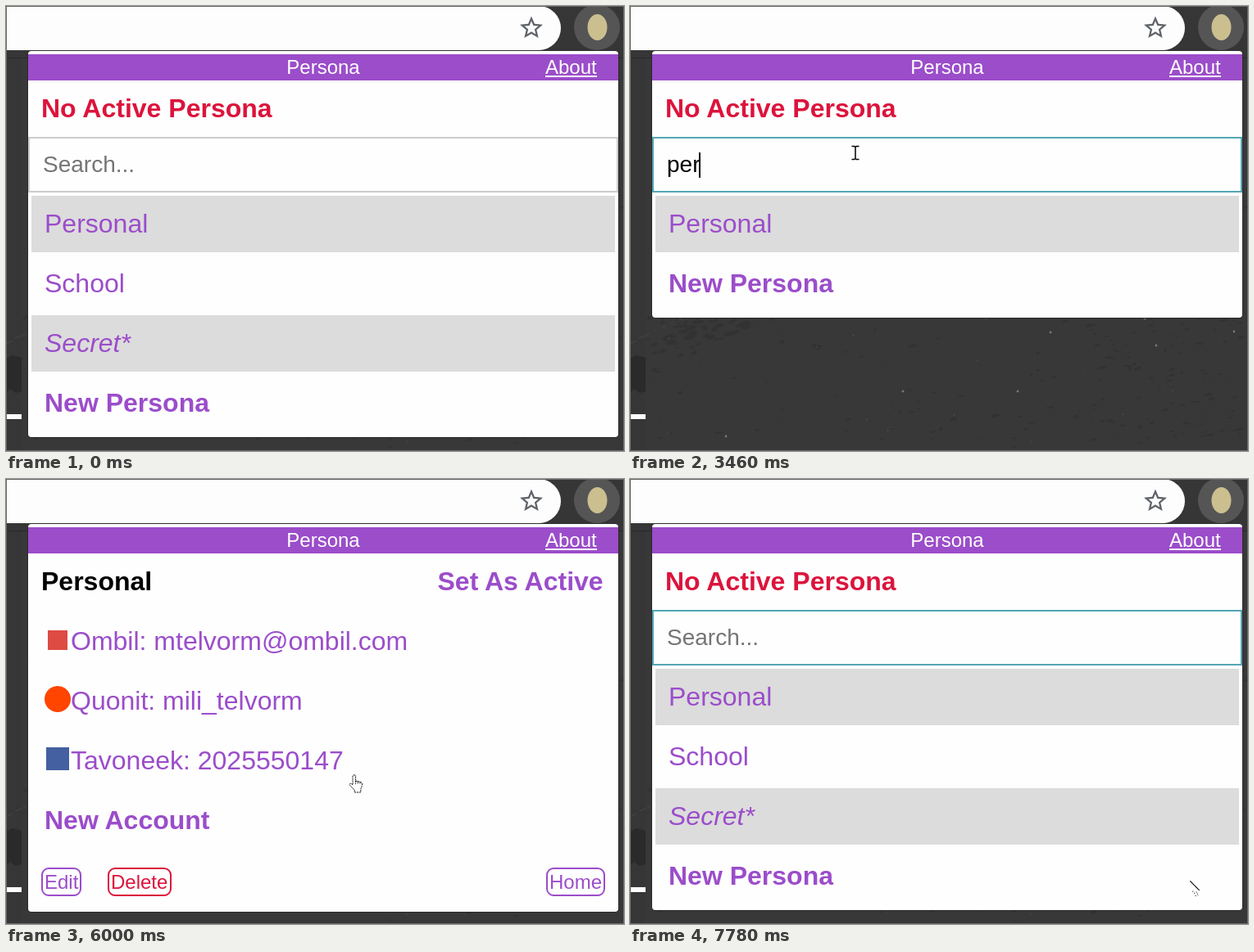
Write an HTML page that moves like this. It is 754 px wide and 544 px high and loops after 8 s.

```html
<!DOCTYPE html>
<html lang="en">
<head>
<meta charset="utf-8">
<title>Persona</title>
<style>
  html, body { margin: 0; width: 100%; height: 100%; overflow: hidden; background: #383838; }
  svg { display: block; width: 754px; height: 544px; }
  text { font-family: "Liberation Sans", Arial, sans-serif; font-size: 32px; fill: #9b4dca; white-space: pre; }
  .b { font-weight: bold; }
  .i { font-style: italic; }
  .s { font-size: 24px; }
  .m { font-size: 28px; }
</style>
</head>
<body>
<svg id="stage" viewBox="0 0 754 544">
  <defs>
    <clipPath id="cut"><rect id="cutBox" width="754" height="544"/></clipPath>
  </defs>
  <rect width="754" height="544" fill="#383838"/>
  <g id="wall"></g>
  <rect width="754" height="63" fill="#363636"/>
  <rect y="63" width="754" height="1" fill="#292929"/>
  <rect y="499" width="19" height="6" fill="#fefefe"/>
  <path d="M0 0H650A27 27 0 0 1 650 54H0Z" fill="#fdfdfe"/>
  <path transform="translate(624.2 9.7) scale(1.4)" fill="#5f6368" fill-rule="evenodd"
    d="M22 9.24l-7.19-.62L12 2 9.19 8.63 2 9.24l5.46 4.73L5.82 21 12 17.27 18.18 21l-1.63-7.03L22 9.24zM12 15.4l-3.76 2.27 1-4.28-3.32-2.88 4.38-.38L12 6.1l1.71 4.04 4.38.38-3.32 2.88 1 4.28L12 15.4z"/>
  <circle cx="721" cy="26" r="28" fill="#555"/>
  <ellipse cx="721.5" cy="26" rx="12" ry="16" fill="#cbbf90"/>

  <g id="popup" clip-path="url(#cut)">
    <rect id="shade" x="26" y="54.5" width="722" rx="5" fill="#2b2b2b"/>
    <rect id="panel" x="27" y="55" width="720" rx="4" fill="#fefefe"/>
    <rect x="27" y="59" width="720" height="32" fill="#9b4dca"/>
    <g id="bar"></g>
    <g id="home">
      <rect id="field" x="28" y="161" width="718" height="66" fill="#fefefe" stroke-width="2"/>
    </g>
    <g id="account"></g>
  </g>

  <g id="arrow">
    <path d="M.5 .5V16l3.7-3.4L7 19l2.6-1.1L7 11.8h5Z" fill="#fefefe"/>
    <path d="M.3 .3L11.7 11.8" stroke="#000" stroke-width="1.1"/>
    <path d="M3 13.2h2M5 15.3h1.5M8 13.5l2.2 4.8M6.5 18.5h2" stroke="#222" stroke-width="1" stroke-dasharray="1.2 1" fill="none"/>
  </g>
  <path id="beam" d="M.5 .5H3.7L5 1.6 6.3 .5H9.5M5 1V16M.5 16.5H3.7L5 15.4 6.3 16.5H9.5" fill="none" stroke="#000" stroke-width="1.5"/>
  <g id="hand" stroke="#111" stroke-width="1" stroke-dasharray="2 .8">
    <path d="M6.8 .8C8 .8 8.6 1.5 8.6 2.5V8L14.2 9.3C15.8 9.7 16.5 10.5 16.5 12 16.5 15 15.2 16.5 14.8 18.5V22H7.2V19.3L1.6 13.5C.6 12 2 10.6 3.5 11.5L5 13V2.5C5 1.5 5.6 .8 6.8 .8Z" fill="#fefefe"/>
    <path d="M8.6 8V12M11.3 8.8V12M14 9.5V12.3" fill="none"/>
  </g>
  <rect x=".5" y=".5" width="753" height="543" fill="none" stroke="#686868"/>
</svg>
<script>
const LOOP = 8000, PURPLE = '#9b4dca', RED = '#dc143c';
const $ = id => document.getElementById(id);

function add(parent, tag, attrs, content) {
  const el = document.createElementNS('http://www.w3.org/2000/svg', tag);
  for (const k in attrs) el.setAttribute(k, attrs[k]);
  if (content) el.textContent = content;
  return parent.appendChild(el);
}
const label = (parent, x, y, str, cls = '', fill = PURPLE) =>
  add(parent, 'text', { x, y, class: cls, style: `fill:${fill}` }, str);
const box = (parent, x, y, width, height, fill) =>
  add(parent, 'rect', { x, y, width, height, fill });
const show = (el, on) => { el.style.display = on ? '' : 'none'; };

// Chalkboard-like backdrop: dark flecks along a diagonal, a few pale specks
function drawWall() {
  let seed = 11;
  const rnd = () => (seed = seed * 16807 % 2147483647) / 2147483647;
  const wall = $('wall');
  const fleck = (x, y, size) => {
    const w = size * (1 + rnd() * 2), h = size * (.4 + rnd() * .6);
    return `M${x} ${y}l${w} ${-h}l${w * .6} ${h * .8}l${-w * .5} ${h}l${-w * .9} ${h * .3}z`;
  };
  let dark = '';
  for (let i = 0; i < 330; i++) {
    const x = 20 + rnd() * 540, spread = (rnd() + rnd() - 1) * 38;
    dark += fleck(x, 425 - x * .41 + spread, 1 + rnd() * 4);
  }
  for (let i = 0; i < 260; i++) dark += fleck(20 + rnd() * 730, 200 + rnd() * 340, .6 + rnd() * 2.2);
  for (let i = 0; i < 120; i++) dark += fleck(560 + rnd() * 190, 360 + rnd() * 170, .6 + rnd() * 2);
  add(wall, 'path', { d: dark, fill: '#323232' });
  add(wall, 'path', { d: 'M0 412L130 350M150 338L310 268M330 262L480 190', stroke: '#464646', 'stroke-dasharray': '5 6 2 9' });
  box(wall, 0, 64, 19, 480, '#363636');
  add(wall, 'path', { d: 'M0 431L8 427 19 430V471L12 473 5 468 0 473Z', fill: '#2a2a2a' });
  add(wall, 'path', { d: 'M0 413l8-4M11 406l8-3', stroke: '#484848' });
  for (let i = 0; i < 45; i++)
    add(wall, 'circle', { cx: 20 + rnd() * 730, cy: 210 + rnd() * 325, r: .5 + rnd() * .6, fill: '#4c4c4c' });
  for (const [cx, cy] of [[139, 256], [265, 348], [428, 375], [513, 399], [628, 382], [642, 415], [737, 398], [473, 471], [333, 471], [117, 526]])
    add(wall, 'circle', { cx, cy, r: 1.4, fill: '#777' });
}
drawWall();

label($('bar'), 342.3, 83, 'Persona', 's', '#fff');
label($('bar'), 658, 83, 'About', 's', '#fff');
box($('bar'), 658, 85, 63, 2, '#fff');

const home = $('home');
label(home, 43, 136, 'No Active Persona', 'b', RED);
const hint = label(home, 45, 203, 'Search...', 'm', '#757575');
const query = label(home, 45, 203, '', 'm', '#000');
const caret = box(home, 45, 179, 2, 31, '#000');
box(home, 31, 232, 712, 69, '#dcdcdc');
label(home, 47, 277, 'Personal');
const others = add(home, 'g', {});
label(others, 47, 350, 'School');
box(others, 31, 378, 712, 69, '#dcdcdc');
label(others, 47, 423, 'Secret*', 'i');
const newPersona = label(home, 47, 496, 'New Persona', 'b');

const account = $('account');
label(account, 43, 136, 'Personal', 'b', '#000');
label(account, 526.5, 136, 'Set As Active', 'b');
box(account, 51, 185, 24, 24, '#dd4b43');
add(account, 'circle', { cx: 63, cy: 269, r: 16, fill: '#ff4500' });
box(account, 49, 328, 28, 28, '#4460a0');
['Ombil: mtelvorm@ombil.com', 'Quonit: mili_telvorm', 'Tavoneek: 2025550147']
  .forEach((str, i) => label(account, 79, 209 + 73 * i, str));
label(account, 47, 428, 'New Account', 'b');
function button(x, width, str, color) {
  add(account, 'rect', { x: x + 1, y: 476, width: width - 2, height: 33, rx: 8, fill: 'none', stroke: color, 'stroke-width': 2 });
  label(account, x + 4, 501, str, 's', color);
}
button(43, 49, 'Edit', PURPLE);
button(124, 78, 'Delete', RED);
button(659, 72, 'Home', PURPLE);

// [time, kind, left, top]
const pointer = [
  [0, ''], [460, 'arrow', 513, 473], [580, 'arrow', 444, 448], [700, 'arrow', 383, 311],
  [850, 'beam', 294, 169], [1000, 'arrow', 297, 151], [1130, 'arrow', 291, 155],
  [1280, 'beam', 281, 161], [1410, 'beam', 272, 165], [1560, 'beam', 270, 171],
  [4690, 'hand', 271, 189], [6000, 'hand', 418, 361], [6150, 'hand', 494, 414],
  [6270, 'arrow', 573, 459], [6420, 'arrow', 635, 477], [6570, 'arrow', 651, 482],
  [6690, 'hand', 660, 481], [6840, 'hand', 667, 488], [6960, 'hand', 671, 491],
  [7110, 'arrow', 683, 491]
];
// [time, page, panel bottom, visible bottom]
const views = [
  [0, 'home', 527, 544], [2940, 'found', 381, 544], [4570, 'account', 529, 381],
  [4690, 'account', 529, 544], [7110, 'account', 529, 201], [7260, 'home', 527, 544]
];
const keys = [2820, 3190, 3460, 3740, 3870, 4020, 4180, 4300];
const at = (list, t) => list.filter(e => e[0] <= t).pop();

function draw(t) {
  const [, page, bottom, visible] = at(views, t);
  $('panel').setAttribute('height', bottom - 55);
  $('shade').setAttribute('height', bottom - 53.5);
  $('cutBox').setAttribute('height', visible);
  show(account, page === 'account');
  show(home, page !== 'account');
  show(others, page === 'home');
  newPersona.setAttribute('y', page === 'found' ? 350 : 496);

  const focused = t >= 1560;
  $('field').setAttribute('stroke', focused ? '#55a6b4' : '#ccc');
  const typed = t < 7260 ? 'personal'.slice(0, keys.filter(k => k <= t).length) : '';
  query.textContent = typed;
  show(hint, !typed);
  show(caret, (t >= 1680 && t < 2080) || (t >= 2670 && t < 7780));
  if (page !== 'account')
    caret.setAttribute('x', typed ? Math.round(44 + query.getComputedTextLength()) : 45);

  const [, kind, x, y] = at(pointer, t);
  for (const id of ['arrow', 'beam', 'hand']) {
    show($(id), id === kind);
    if (id === kind) $(id).setAttribute('transform', `translate(${x} ${y})`);
  }
}

function tick() {
  draw(performance.now() % LOOP);
  requestAnimationFrame(tick);
}
tick();
</script>
</body>
</html>
```
